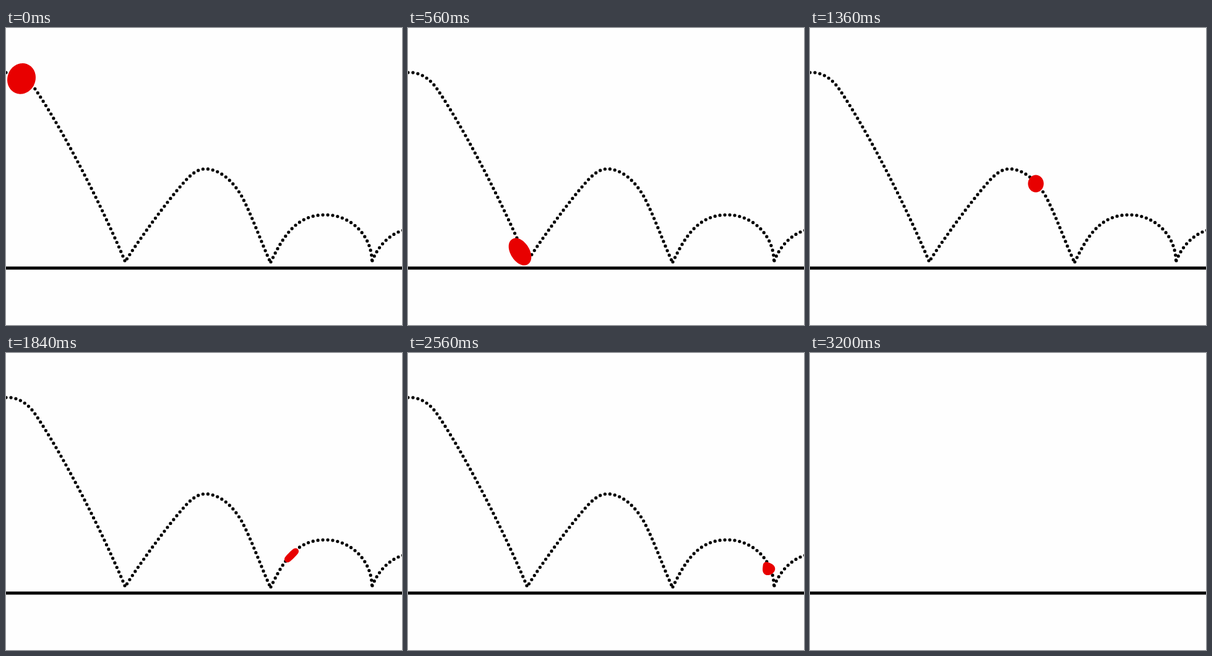
Write an HTML page that moves like this. It is 640 px wide and 480 px high and loops after 4880 ms.

```html
<!DOCTYPE html>
<html lang="en">
<head>
<meta charset="utf-8">
<title>Bouncing ball</title>
<style>
  html, body { margin: 0; width: 100%; height: 100%; overflow: hidden; background: #fefefe; }
  svg { display: block; width: 100%; height: 100%; }
</style>
</head>
<body>
<svg viewBox="0 0 640 480">
  <path d="M0 388H640" stroke="#000" stroke-width="5"/>
  <g id="scene">
    <path id="trail" fill="none" stroke="#000" stroke-width="5.2" stroke-linecap="round"/>
    <path id="ball" fill="#e80000" stroke="#e80000" stroke-width="10" stroke-linejoin="round"/>
  </g>
</svg>
<script>
const LOOP = 4880, STEP = 80, END = 3200, SIDES = 40;
const $ = id => document.getElementById(id);

// Curve of each bounce and the number of gaps between its dots.
const arcs = [
  ["M0 72C18 70.5 35 81 47 98.5C93 166 154 286 192 376", 46],
  ["M195.5 373C215 342.5 262 277 292 244.5C302 234 311 228 322 227.7" +
   "C345 228 366 246 381 272C397 302 412 345 425.5 374.5", 48],
  ["M428 378C447 339 468 302 515 302C553 301 589.5 331 591.5 375", 30],
  ["M592 376C602 351 621 333 641.5 327", 9]
];

// time, x, offset below the trail, half length, half width, angle, taper
const poses = [
  [80, 25, 4, 20.2, 17.6, 112, 0],
  [240, 70, 2, 19, 16, 95, 0],
  [560, 181, 11, 19, 10.3, 58, 0],
  [640, 193, -3, 14, 12.5, 58, 0],
  [1040, 312, 1.3, 8, 6.8, 90, 0],
  [1360, 365, 1.5, 9, 7.7, 90, 0],
  [1680, 428, -4, 8.5, 8, 100, 0],
  [1840, 461.5, 2, 9.2, 0.7, 135, 0],
  [2160, 517, 0, 5, 4.5, 135, 0],
  [2560, 582, 6.7, 6, 4.5, 240, -0.7],
  [2640, 588.5, 15, 5, 3.5, 250, -0.5],
  [2720, 597, 1, 4, 3, 250, 0],
  [3120, 640, 0, 3, 3, 250, 0]
];

const dots = arcs.flatMap(([d, gaps]) => {
  const path = document.createElementNS("http://www.w3.org/2000/svg", "path");
  path.setAttribute("d", d);
  const len = path.getTotalLength();
  return Array.from({ length: gaps + 1 }, (_, i) => {
    const p = path.getPointAtLength(len * i / gaps);
    return [p.x, p.y];
  });
});
$("trail").setAttribute("d", dots.map(p => `M${p}h.01`).join(""));

// Row of a table, interpolated on its first column.
function lookup(rows, v) {
  let i = 1;
  while (i < rows.length - 1 && rows[i][0] < v) i++;
  const a = rows[i - 1], b = rows[i], f = (v - a[0]) / (b[0] - a[0]);
  return a.map((s, j) => s + (b[j] - s) * f);
}

// Egg outline; the thick round stroke softens it.
function egg(x, y, a, b, angle, taper) {
  const turn = angle * Math.PI / 180, c = Math.cos(turn), s = Math.sin(turn);
  const pts = Array.from({ length: SIDES }, (_, i) => {
    const w = i * 2 * Math.PI / SIDES;
    const u = a * Math.cos(w), v = b * Math.sin(w) * (1 + taper * Math.cos(w));
    return [x + u * c - v * s, y + u * s + v * c];
  });
  return `M${pts.join("L")}Z`;
}

function draw(ms) {
  const t = Math.max(STEP, Math.floor(ms / STEP) * STEP);
  $("scene").style.display = t < END ? "" : "none";
  if (t >= END) return;
  const [, x, dy, ...shape] = lookup(poses, t);
  $("ball").setAttribute("d", egg(x, lookup(dots, x)[1] + dy, ...shape));
}

const start = performance.now();
function tick() {
  draw((performance.now() - start) % LOOP);
  requestAnimationFrame(tick);
}
tick();
</script>
</body>
</html>
```
